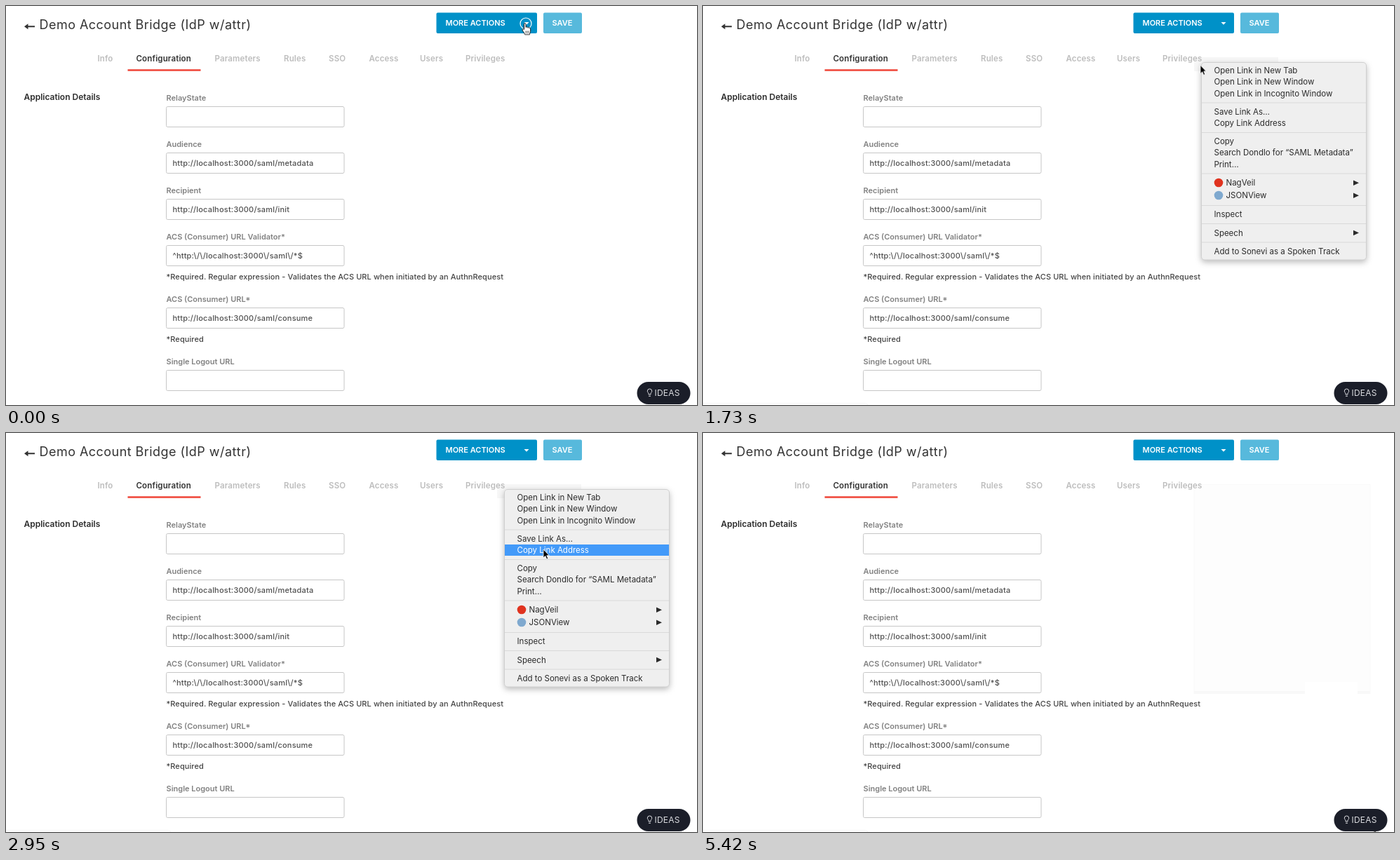
An HTML page for the animation above (5520 ms loop, 985 by 569 pixels).

```html
<!DOCTYPE html>
<html lang="en">
<head>
<meta charset="utf-8">
<title>Application settings</title>
<style>
html, body { margin: 0; width: 100%; height: 100%; overflow: hidden; background: #fff; }
svg { display: block; width: 985px; height: 569px; font-family: Inter, "Open Sans", sans-serif; }
text { white-space: pre; }

.title { font-size: 18px; letter-spacing: .46px; fill: #333; }
.section { font-size: 12px; font-weight: 600; fill: #2d2d2d; }
.tabs { font-size: 11.5px; font-weight: 600; letter-spacing: .15px; fill: #bdbdbd; }
.tabs .on { fill: #333; }
.label { font-size: 11px; font-weight: 600; fill: #828282; }
.value { font-size: 11px; font-weight: 500; letter-spacing: .2px; fill: #505050; }
.hint { font-size: 11px; font-weight: 500; letter-spacing: .08px; fill: #444; }
.field { fill: #fff; stroke: #c6c6c6; }
.btn { font-size: 11px; font-weight: 600; fill: #fff; }
.drop { font-size: 12px; letter-spacing: .1px; fill: #333; }
.ideas { font-size: 12px; letter-spacing: .2px; }
.menu { font-size: 11.5px; fill: #2b2b2b; }
.card { filter: drop-shadow(0 1px 2px #0002); }
.panel { filter: drop-shadow(0 3px 4px #0004); }
.row { fill: #fff; }
.row rect { fill: #439af9; }

/* every part shares one loop and changes in hard steps */
.anim { animation: 5.52s step-end infinite; }
.more { animation-name: more; }
.ring { animation-name: ring; }
.drop { animation-name: drop; }
.hover0 { animation-name: hover0; }
.hover1 { animation-name: hover1; }
.status { animation-name: status; }
.menu { animation-name: menu; }
.halo { animation-name: halo; }
.residue { animation-name: residue; }
.notch { animation-name: notch; }
.row0 { animation-name: row0; }
.row1 { animation-name: row1; }
.row2 { animation-name: row2; }
.row3 { animation-name: row3; }
.row4 { animation-name: row4; }
.ideas { animation-name: ideas; }
.pointer { animation-name: move; }
.hand { animation-name: hand; }
.arrow { animation-name: arrow; }

@keyframes more { 0% { fill: #0091c8 } 4.16% { fill: #029bd7 } 13.94%, 100% { fill: #0091c8 } }
@keyframes ring { 0% { opacity: 1 } 4.16%, 100% { opacity: 0 } }
@keyframes drop { 0% { opacity: 0 } 1.44% { opacity: 1 } 26.63%, 100% { opacity: 0 } }
@keyframes hover0 { 0% { opacity: 0 } 10.68% { opacity: 1 } 12.31%, 100% { opacity: 0 } }
@keyframes hover1 { 0% { opacity: 0 } 12.31%, 100% { opacity: 1 } }
@keyframes status { 0% { opacity: 0 } 12.31% { opacity: 1 } 29.71% { opacity: .55 } 31.34%, 100% { opacity: .2 } }
@keyframes menu {
  0% { opacity: 0 } 25.18% { opacity: 1 } 55.07% { opacity: .7 }
  56.52% { opacity: .35 } 58.15% { opacity: .07 } 71.19%, 100% { opacity: 0 }
}
@keyframes halo { 0% { opacity: 0 } 26.63% { opacity: 1 } 58.15%, 100% { opacity: 0 } }
@keyframes residue { 0% { opacity: 0 } 58.15%, 100% { opacity: 1 } }
@keyframes notch { 0% { opacity: 0 } 74.27%, 100% { opacity: 1 } }
@keyframes row0 { 0% { opacity: 0 } 34.6% { opacity: 1 } 37.77%, 100% { opacity: 0 } }
@keyframes row1 { 0% { opacity: 0 } 37.77% { opacity: 1 } 39.31%, 100% { opacity: 0 } }
@keyframes row2 { 0% { opacity: 0 } 39.31% { opacity: 1 } 40.85%, 100% { opacity: 0 } }
@keyframes row3 { 0% { opacity: 0 } 40.85% { opacity: 1 } 44.02%, 100% { opacity: 0 } }
@keyframes row4 { 0% { opacity: 0 } 44.02% { opacity: 1 } 51.99% { opacity: 0 } 53.44%, 100% { opacity: 1 } }
@keyframes ideas { 0% { color: #dcdde1 } 82.06% { color: #f4f4f6 } 90.03%, 100% { color: #dcdde1 } }
@keyframes hand { 0% { opacity: 1 } 22.46% { opacity: 0 } 82.06%, 100% { opacity: 1 } }
@keyframes arrow { 0% { opacity: 0 } 22.46% { opacity: 1 } 82.06%, 100% { opacity: 0 } }
@keyframes move {
  0% { transform: translate(740px, 24.5px) }
  9.05% { transform: translate(737px, 40px) }
  10.68% { transform: translate(727px, 61px) }
  12.31% { transform: translate(713.5px, 77px) }
  13.94% { transform: translate(713px, 79.5px) }
  16.48% { transform: translate(709px, 84.5px) }
  34.6% { transform: translate(712px, 88px) }
  36.23% { transform: translate(722px, 98px) }
  37.77% { transform: translate(736px, 113px) }
  39.31% { transform: translate(750px, 130px) }
  40.85% { transform: translate(760px, 147px) }
  42.39% { transform: translate(766px, 160px) }
  44.02% { transform: translate(766px, 164px) }
  45.47% { transform: translate(766px, 165px) }
  47.1% { transform: translate(766px, 166px) }
  71.19% { transform: translate(776px, 190px) }
  72.64% { transform: translate(822px, 282px) }
  74.27% { transform: translate(886px, 400px) }
  75.72% { transform: translate(930px, 479px) }
  78.98% { transform: translate(934px, 497px) }
  80.61% { transform: translate(941px, 528px) }
  82.06% { transform: translate(949px, 561px) }
  83.69% { transform: translate(951px, 562px) }
  85.14% { transform: translate(952px, 563px) }
  86.77% { transform: translate(953px, 565px) }
  88.4% { transform: translate(958px, 580px) }
  98.18%, 100% { transform: translate(958px, 567.8px) }
}
</style>
</head>
<body>
<svg viewBox="0 0 985 569">
  <path class="anim halo" d="M700 73H820V93H700z" fill="#f7f7f7"/>
  <g class="anim residue">
    <rect x="700" y="73.5" width="251" height="298" fill="#fdfdfd" stroke="#f9f9f9"/>
    <path d="M700 370H951" stroke="#f8f8f8" stroke-width="4"/>
    <path class="anim notch" d="M858 355H933V373H858z" fill="#fff"/>
  </g>

  <path d="M26 29.3l5.5-4v3H41v2H31.500v3z" fill="#333"/>
  <text class="title" x="47.5" y="32.5">Demo Account Bridge (IdP w/attr)</text>
  <g class="tabs" id="tabs"></g>
  <path d="M173.5 91.5H277.5" stroke="#ef4437" stroke-width="2.4"/>
  <text class="section" x="25.5" y="134">Application Details</text>
  <g id="form"></g>

  <rect class="anim more" x="613.5" y="9.5" width="143.5" height="29.5" rx="2"/>
  <path d="M738.5 23h7l-3.5 3.8z" fill="#fff"/>
  <circle class="anim ring" cx="741" cy="25" r="8" fill="none" stroke="#fff" stroke-width="1.2"/>
  <text class="btn" x="626.5" y="28">MORE ACTIONS</text>
  <rect x="766" y="9.5" width="55" height="29.5" rx="2" fill="#57b9dc"/>
  <text class="btn" x="778.5" y="28">SAVE</text>

  <g class="anim drop">
    <rect class="card" x="614" y="43.5" width="148" height="88" rx="2" fill="#fff" stroke="#c9c9c9"/>
    <path class="anim hover0" d="M614.5 49h147v26h-147z" fill="#eaf7fc"/>
    <g class="anim hover1">
      <path d="M614.5 75h147v26h-147z" fill="#eaf7fc"/>
      <circle cx="637.5" cy="88" r="5" fill="none" stroke="#f8fcfe" stroke-width="1.5"/>
    </g>
    <text x="631.5" y="65.5">Vendor Homepage</text>
    <text x="645.5" y="91.5">SAML Metadata</text>
    <text x="631.5" y="118">Delete</text>
  </g>

  <path class="anim status" d="M0 566.5H231q4 0 4 3" fill="none" stroke="#d6d6d6"/>

  <rect x="899.5" y="536" width="76" height="32" rx="16" fill="#1b1e29"/>
  <g class="anim ideas">
    <path d="M916 554v-1.5c-.2-1-1.7-1.5-1.7-3.3a3.2 3.2 0 0 1 6.4 0c0 1.8-1.5 2.3-1.7 3.3v1.5zM916 556.3h3" fill="none" stroke="currentColor"/>
    <text x="924.5" y="556" fill="currentColor">IDEAS</text>
  </g>

  <g class="anim menu">
    <rect class="panel" x="710.5" y="80.5" width="235" height="281.5" rx="4.5" fill="#efefef" stroke="#cfcfcf"/>
    <path d="M711 138h234M711 180.5h234M711 239h234M711 284.5h234M711 310.5h234M711 337h234" stroke="#d9d9d9"/>
    <g id="items"></g>
    <circle cx="735" cy="252" r="6.3" fill="#e0331f"/>
    <circle cx="735" cy="270" r="6.3" fill="#7fa9cf"/>
    <path d="M927 248.5l8 3.7-8 3.7zM927 266.5l8 3.7-8 3.7zM927 319.8l8 3.7-8 3.7z"/>
  </g>

  <g class="anim pointer">
    <g class="anim hand" fill="#fff" stroke="#111" stroke-linejoin="round">
      <path d="M-1.5 9V1.5C-1.5-.3 1-.3 1 1.5V6c.6-1 2.3-.8 2.4.3.7-.8 2.2-.5 2.3.6.8-.5 2 0 2 1.2v3c0 2-1 2.6-1.2 5H-.4C-.6 14.5-3.5 11.5-4 9.6c-.3-1.4 1.2-1.9 2.5-.6z"/>
      <path d="M1 11v3M3 11v3M5 11v3" stroke-width=".7"/>
    </g>
    <path class="anim arrow" d="M0 0V12l2.8-2.6 1.9 4.4 2-.9-1.9-4.2H8.3z" fill="#000" stroke="#fff" stroke-width=".8"/>
  </g>
</svg>
<script>
const text = (x, y, s, cls = '') => `<text class="${cls}" x="${x}" y="${y}">${s}</text>`;
const fill = (id, parts) => { document.getElementById(id).innerHTML = parts.join(''); };

const tabs = [
  [130.5, 'Info'], [185.5, 'Configuration', 'on'], [297.5, 'Parameters'], [396, 'Rules'],
  [460, 'SSO'], [517.5, 'Access'], [590, 'Users'], [655, 'Privileges'],
];
fill('tabs', tabs.map(([x, s, cls]) => text(x, 79, s, cls)));

const fields = [
  [143, 'RelayState', ''],
  [209, 'Audience', 'http://localhost:3000/saml/metadata'],
  [275, 'Recipient', 'http://localhost:3000/saml/init'],
  [341, 'ACS (Consumer) URL Validator*', '^http:\\/\\/localhost:3000\\/saml\\/*$',
    '*Required. Regular expression - Validates the ACS URL when initiated by an AuthnRequest'],
  [430, 'ACS (Consumer) URL*', 'http://localhost:3000/saml/consume', '*Required'],
  [519, 'Single Logout URL', ''],
];
fill('form', fields.map(([y, label, value, hint = '']) =>
  text(228.5, y - 8, label, 'label') +
  `<rect class="field" x="228.5" y="${y + .5}" width="253.5" height="29" rx="2"/>` +
  text(237.5, y + 19, value, 'value') + text(228.5, y + 49, hint, 'hint')));

const links = [
  [96, 'Open Link in New Tab'], [112, 'Open Link in New Window'], [128.5, 'Open Link in Incognito Window'],
  [155, 'Save Link As…'], [171, 'Copy Link Address'],
];
const others = [
  [197, 'Copy'], [213, 'Search Dondlo for “SAML Metadata”'], [229.5, 'Print…'],
  [256, 'NagVeil', 745.5], [274, 'JSONView', 745.5], [301, 'Inspect'], [327.5, 'Speech'],
  [354, 'Add to Sonevi as a Spoken Track'],
];
const item = ([y, s, x = 728.5]) => text(x, y, s);
const lit = (link, i) => `<g class="anim row row${i}">
  <rect x="711" y="${link[0] - 12}" width="234" height="16"/>${item(link)}</g>`;
fill('items', [...links, ...others].map(item).concat(links.map(lit)));
</script>
</body>
</html>
```
